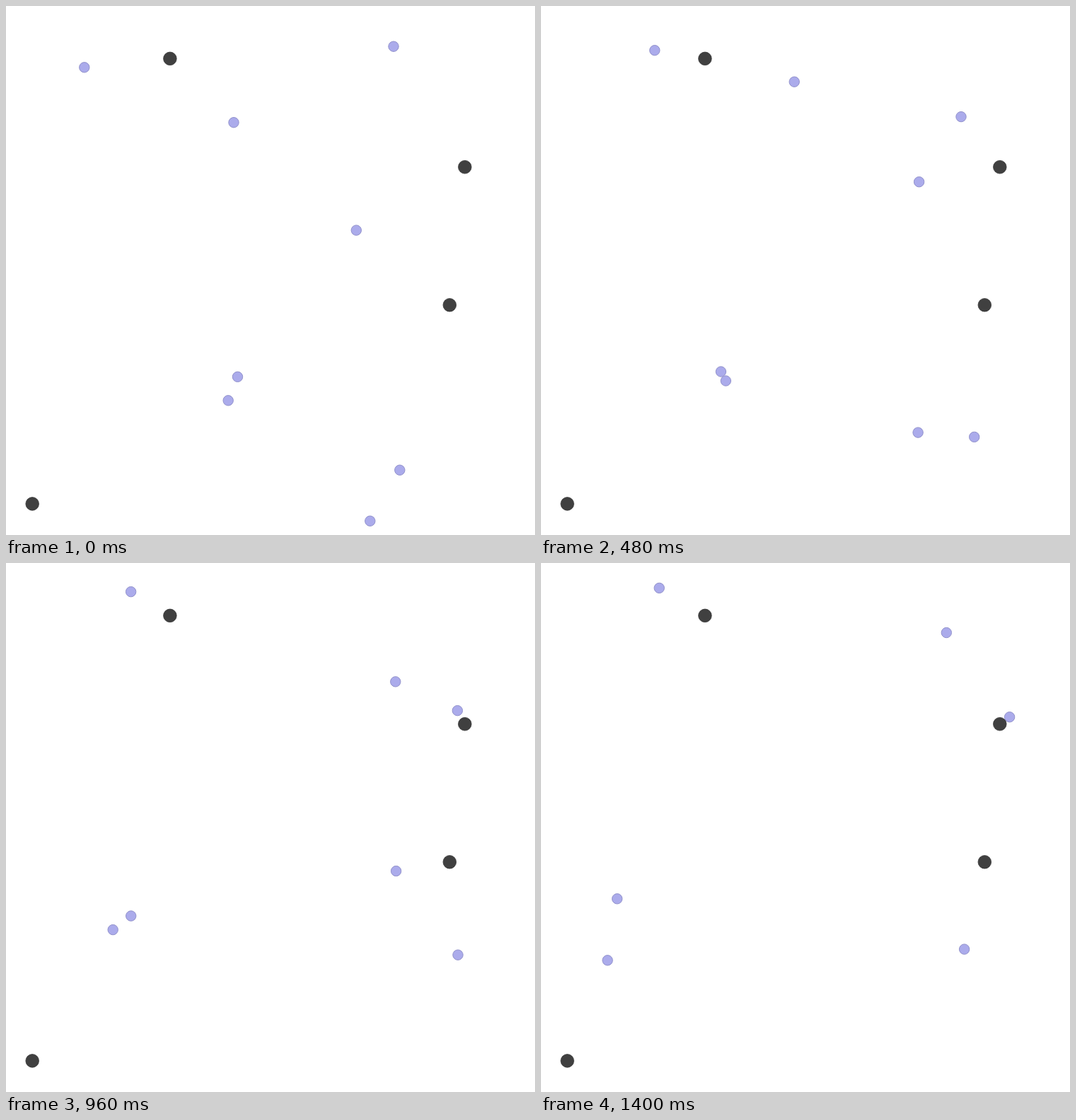
An HTML page for the animation above (1.44 s loop, 748 by 748 pixels).

```html
<!DOCTYPE html>
<html lang="en">
<head>
<meta charset="utf-8">
<title>Drifting dots</title>
<style>
  html, body { margin: 0; width: 100%; height: 100%; overflow: hidden; background: #fff; }
  svg { display: block; }
  #stage { width: 100vw; height: 100vh; }
  .pane { overflow: hidden; }
  .mover { fill: #ababeb; stroke: #9191cb; stroke-width: 1; }
  .anchor { fill: #404040; stroke: #383838; stroke-width: 0.8; }
</style>
</head>
<body>
<svg id="stage" viewBox="0 0 748 748"></svg>
<script>
const NS = "http://www.w3.org/2000/svg";
const LOOP = 1440, STEP = 40, HALF = 374;
const stage = document.getElementById("stage");

const keys = [0, 320, 480, 640, 800, 1120, 1400];

// Each pane clips its own pair of moving dots.
const panes = [
  { x: 0, y: 0, paths: [
    { xs: [110.8, 144.2, 160.8, 170, 174.5, 176, 167.2], ys: [86.8, 76, 62.7, 49.6, 43.6, 39, 35.4] },
    { xs: [322, 344, 358.2, 370.3, 379, 388, 394], ys: [164.7, 129.8, 107.2, 82.3, 55.3, 4, -38] }
  ] },
  { x: HALF, y: 0, paths: [
    { xs: [548, 574.6, 594, 613, 628.2, 646.5, 662.6], ys: [57.2, 119.2, 156.6, 184.2, 201.2, 211.8, 217.8] },
    { xs: [495.3, 525.2, 534.6, 539.8, 544.2, 558.6, 573.3], ys: [317.1, 273.4, 248.7, 223, 195.3, 141.3, 98.5] }
  ] },
  { x: 0, y: HALF, paths: [
    { xs: [327.5, 285.8, 254.4, 218.8, 183.9, 123.6, 94.1], ys: [524.3, 521.5, 517, 513, 513.6, 528.9, 561.8] },
    { xs: [314.2, 284.4, 261.3, 236.6, 207.9, 147.1, 107.7], ys: [557.8, 540, 530, 521.8, 510.6, 488.4, 474.8] }
  ] },
  { x: HALF, y: HALF, paths: [
    { xs: [556.8, 585.3, 612.7, 631.5, 639.4, 630.8, 598.6], ys: [656.2, 635.9, 609.4, 582.4, 563.4, 550.2, 546.1] },
    { xs: [514.8, 525.7, 533.1, 540, 546.7, 555.4, 561], ys: [728.2, 659.2, 603.1, 543.8, 485.9, 389.1, 309] }
  ] }
];

const anchors = [[231.9, 74.4], [648.8, 227.7], [627.3, 422.8], [37.2, 703.9]];

function add(parent, tag, attrs) {
  const el = document.createElementNS(NS, tag);
  for (const name in attrs) el.setAttribute(name, attrs[name]);
  return parent.appendChild(el);
}

// Slope at key i of the parabola through three neighbouring keys.
function slope(v, i) {
  const m = Math.min(Math.max(i, 1), keys.length - 2);
  const h0 = keys[m] - keys[m - 1], h1 = keys[m + 1] - keys[m];
  const d0 = (v[m] - v[m - 1]) / h0, d1 = (v[m + 1] - v[m]) / h1;
  const bend = (d1 - d0) / (h0 + h1);
  return d0 + bend * (2 * keys[i] - keys[m] - keys[m - 1]);
}

function curve(v, t) {
  let i = 0;
  while (i < keys.length - 2 && t > keys[i + 1]) i++;
  const h = keys[i + 1] - keys[i], u = (t - keys[i]) / h, w = 1 - u;
  return w * w * ((1 + 2 * u) * v[i] + u * h * slope(v, i))
       + u * u * ((1 + 2 * w) * v[i + 1] - w * h * slope(v, i + 1));
}

const movers = [];
for (const { x, y, paths } of panes) {
  const pane = add(stage, "svg", {
    class: "pane", x, y, width: HALF, height: HALF, viewBox: [x, y, HALF, HALF].join(" ")
  });
  for (const path of paths) {
    movers.push({ path, dot: add(pane, "circle", { class: "mover", r: 7.2 }) });
  }
}
for (const [cx, cy] of anchors) add(stage, "circle", { class: "anchor", cx, cy, r: 9.3 });

function draw(ms) {
  const t = Math.floor((ms % LOOP) / STEP) * STEP;
  for (const { path, dot } of movers) {
    dot.setAttribute("cx", curve(path.xs, t).toFixed(2));
    dot.setAttribute("cy", curve(path.ys, t).toFixed(2));
  }
}

let start = null;
function tick(now) {
  if (start === null) start = now;
  draw(Math.max(0, now - start));
  requestAnimationFrame(tick);
}
draw(0);
requestAnimationFrame(tick);
</script>
</body>
</html>
```
